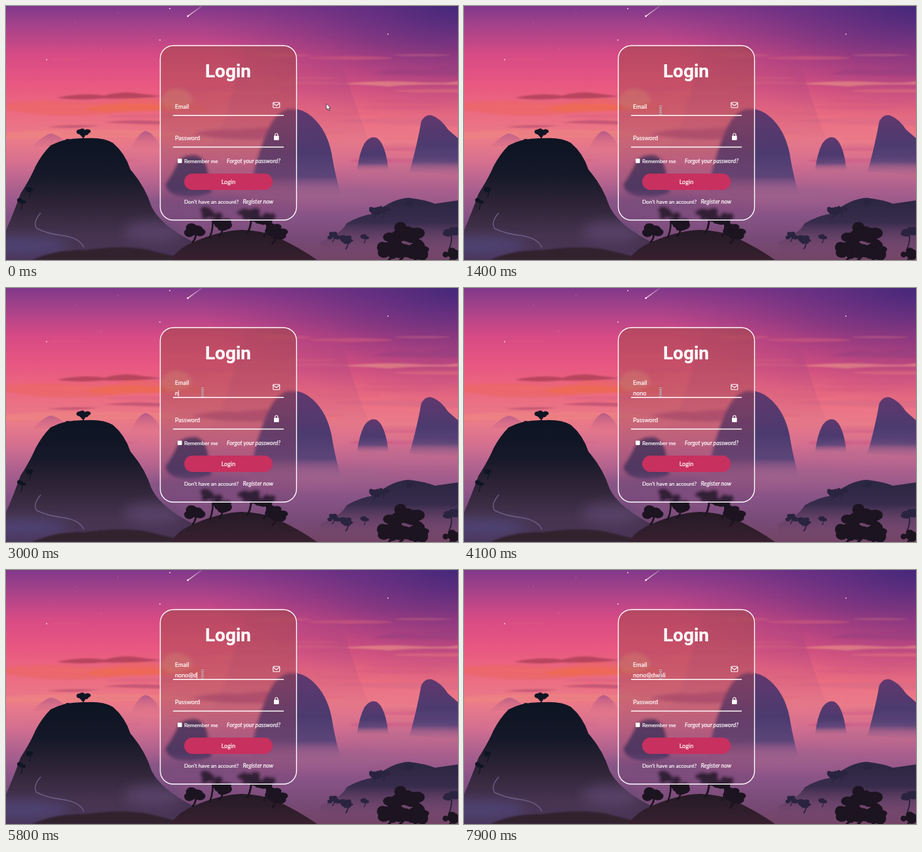
Recreate the animation shown at these times as an HTML page. Size 690 px wide and 388 px high, loop 8000 ms.

```html
<!DOCTYPE html>
<html lang="en">
<head>
<meta charset="utf-8">
<title>Login form</title>
<style>
  html, body { margin: 0; width: 100%; height: 100%; overflow: hidden; background: #744568; }
  svg { display: block; }
  text { font: 9.1px Lato, sans-serif; fill: #fff; stroke: #fff; stroke-width: .2px; }
  .title { font: 600 28px Roboto, sans-serif; text-anchor: middle; }
  .small { font-size: 8.15px; }
  .link { font-size: 8.8px; font-style: italic; }
</style>
</head>
<body>
<svg width="690" height="388" viewBox="0 0 690 388">
  <defs>
    <linearGradient id="sky" x2="0" y2="1">
      <stop offset="0" stop-color="#80388a"/>
      <stop offset=".08" stop-color="#a6428a"/>
      <stop offset=".19" stop-color="#d64b85"/>
      <stop offset=".3" stop-color="#e85681"/>
      <stop offset=".41" stop-color="#ec6a80"/>
      <stop offset=".53" stop-color="#ea7b8a"/>
      <stop offset=".62" stop-color="#d46f90"/>
      <stop offset=".72" stop-color="#aa608e"/>
      <stop offset=".83" stop-color="#875386"/>
      <stop offset=".92" stop-color="#774a76"/>
      <stop offset="1" stop-color="#734466"/>
    </linearGradient>
    <radialGradient id="night" gradientUnits="userSpaceOnUse" cx="690" cy="0" r="400" gradientTransform="scale(1 .45)">
      <stop offset="0" stop-color="#3f2678" stop-opacity=".9"/>
      <stop offset=".45" stop-color="#552a7c" stop-opacity=".55"/>
      <stop offset="1" stop-color="#7a3080" stop-opacity="0"/>
    </radialGradient>
    <linearGradient id="giant" x2="0" y2="1">
      <stop offset="0" stop-color="#a84880" stop-opacity="0"/>
      <stop offset=".4" stop-color="#a84880" stop-opacity=".35"/>
      <stop offset="1" stop-color="#b85c88" stop-opacity="0"/>
    </linearGradient>
    <linearGradient id="far" x2="0" y2="1">
      <stop offset="0" stop-color="#60386e"/>
      <stop offset=".5" stop-color="#4c3a6e"/>
      <stop offset=".78" stop-color="#5c4579"/>
      <stop offset="1" stop-color="#8e5c8c" stop-opacity=".1"/>
    </linearGradient>
    <linearGradient id="pale" x2="0" y2="1">
      <stop offset="0" stop-color="#b4588a"/>
      <stop offset="1" stop-color="#d97088" stop-opacity=".2"/>
    </linearGradient>
    <linearGradient id="near" x2="0" y2="1">
      <stop offset="0" stop-color="#0c1422"/>
      <stop offset=".3" stop-color="#151828"/>
      <stop offset=".55" stop-color="#2f2437"/>
      <stop offset=".8" stop-color="#46334f"/>
      <stop offset="1" stop-color="#4a3558"/>
    </linearGradient>
    <linearGradient id="hill" x2="0" y2="1">
      <stop offset="0" stop-color="#2b2642"/>
      <stop offset=".4" stop-color="#382c4c"/>
      <stop offset=".9" stop-color="#744568" stop-opacity="0"/>
    </linearGradient>
    <linearGradient id="mound" x2="0" y2="1">
      <stop offset="0" stop-color="#251a26"/>
      <stop offset="1" stop-color="#38202f"/>
    </linearGradient>
    <linearGradient id="tint" x2="0" y2="1">
      <stop offset="0" stop-color="#a04840" stop-opacity=".5"/>
      <stop offset=".45" stop-color="#a04858" stop-opacity=".42"/>
      <stop offset="1" stop-color="#643a6c" stop-opacity=".28"/>
    </linearGradient>
    <linearGradient id="tail" x1="1" y1="0" x2="0" y2="1">
      <stop offset="0" stop-color="#fff" stop-opacity=".15"/>
      <stop offset="1" stop-color="#ffe4ea"/>
    </linearGradient>
    <filter id="soft" x="-20%" y="-80%" width="140%" height="260%"><feGaussianBlur stdDeviation="1.2"/></filter>
    <filter id="mist" x="-30%" y="-100%" width="160%" height="300%"><feGaussianBlur stdDeviation="9"/></filter>
    <filter id="glass" x="0" y="0" width="1" height="1"><feGaussianBlur stdDeviation="2.3"/></filter>
    <clipPath id="cardClip"><rect x="235.5" y="60.5" width="208" height="266.5" rx="20"/></clipPath>
  </defs>

  <g id="scene">
    <path fill="url(#sky)" d="M0 0H690V388H0z"/>
    <path fill="url(#night)" d="M0 0H690V300H0z"/>
    <g id="streaks" filter="url(#soft)"></g>
    <g filter="url(#soft)">
      <path fill="#ec6660" opacity=".6" d="M0 149Q50 142 100 147T190 140Q235 142 300 150L310 162Q230 158 150 165T0 158z"/>
      <path fill="#b04058" opacity=".85" d="M78 140Q120 132 150 137Q180 129 205 134L236 138Q185 143 150 141Q110 145 78 140z"/>
      <path fill="#ee6a52" opacity=".8" d="M120 157Q160 147 200 149T270 156Q220 161 180 160Q150 165 120 157z"/>
      <path fill="#f4a088" opacity=".5" d="M236 146Q240 127 262 126Q284 130 285 146Q270 160 244 156z"/>
      <path fill="#b64e70" opacity=".7" d="M62 185Q100 180 142 183Q110 188 62 185zM150 178Q190 172 238 176L236 181Q190 180 150 178z"/>
      <path fill="#b04a74" opacity=".75" d="M284 196Q315 186 350 189L400 185V203Q345 207 284 196z"/>
      <path fill="#f08a80" opacity=".5" d="M0 193Q90 186 250 191L290 199Q200 200 0 203z"/>
      <path fill="#e68a86" opacity=".7" d="M515 119Q570 113 620 116T690 115V120Q620 119 585 123Q550 120 515 119z"/>
      <path fill="#933c80" opacity=".5" d="M560 104Q590 94 620 98T690 87V106Q630 105 560 104z"/>
      <path fill="#d46b88" opacity=".5" d="M500 176Q560 169 690 173V183Q590 181 500 176z"/>
    </g>
    <path fill="url(#giant)" d="M375 40Q352 105 341 150T295 235H570Q548 195 534 152T498 40z"/>
    <path fill="url(#pale)" d="M40 215Q58 197 68 195Q82 196 97 215zM190 219Q203 192 213 191Q226 193 238 219z"/>
    <path fill="url(#far)" d="M372 290Q378 240 395 200Q408 163 430 157Q452 155 468 170Q490 190 497 225Q503 262 512 290z"/>
    <path fill="url(#far)" d="M536 251Q539 225 547 210Q555 198 565 201Q579 208 584 251z"/>
    <path fill="url(#far)" d="M616 253Q627 215 634 176Q640 165 650 167Q664 172 675 189L690 202V258z"/>
    <path fill="#3c3560" d="M243 272Q255 255 262 238Q270 226 290 227Q304 231 308 250L314 285Q290 295 262 290Q244 285 243 272z"/>
    <g filter="url(#mist)">
      <ellipse cx="480" cy="288" rx="110" ry="10" fill="#9c648e" opacity=".6"/>
      <ellipse cx="620" cy="254" rx="100" ry="8" fill="#b66c90" opacity=".6"/>
      <ellipse cx="290" cy="302" rx="85" ry="12" fill="#755283" opacity=".8"/>
    </g>
    <path fill="url(#near)" d="M0 343Q14 310 22 287Q38 262 45 245Q55 226 68 213Q90 201 121 202Q148 200 163 209Q182 225 190 250Q212 275 222 306Q236 335 285 360L300 388H0z"/>
    <g filter="url(#mist)">
      <ellipse cx="225" cy="345" rx="45" ry="16" fill="#634a74" opacity=".65"/>
      <ellipse cx="20" cy="366" rx="75" ry="13" fill="#51457a" opacity=".85"/>
    </g>
    <path fill="none" stroke="#74648c" stroke-width="1.5" opacity=".85" d="M53 316Q40 331 47 340Q63 348 89 351Q113 355 119 369"/>
    <path fill="#33202f" filter="url(#soft)" d="M40 388Q75 372 120 373Q175 365 215 372L280 388z"/>
    <path fill="url(#hill)" d="M480 360Q510 350 520 332Q540 320 562 317Q590 294 615 293Q640 296 655 302L690 297V388H480z"/>
    <path fill="url(#mound)" d="M251 388Q263 370 285 361Q326 343 360 342Q390 343 412 352Q450 370 475 388z"/>
    <g id="trees" stroke-linecap="round"></g>
    <path stroke="url(#tail)" stroke-width="1.4" d="M299 0L277 16"/>
    <circle cx="277.5" cy="15.5" r="1.2" fill="#fff"/>
    <g id="stars" fill="#ffd9ee"></g>
  </g>

  <g clip-path="url(#cardClip)">
    <use href="#scene" filter="url(#glass)"/>
    <path fill="url(#tint)" d="M235 60h210v268H235z"/>
  </g>
  <rect x="235.5" y="60.5" width="208" height="266.5" rx="20" fill="none" stroke="#fff" stroke-width="1.4"/>

  <text class="title" x="339" y="109">Login</text>
  <path stroke="#fff" stroke-width="1.4" d="M255 167.3H424M255 215.5H424"/>
  <text id="label" x="258" y="157">Email</text>
  <text id="value" x="258" y="164"></text>
  <path id="caret" stroke="#fff" stroke-width=".8" d="M0 156v10"/>
  <text x="258" y="205">Password</text>
  <g fill="none" stroke="#fff" stroke-width="1.1">
    <rect x="407.8" y="147.2" width="10" height="8" rx="1"/>
    <path d="M408 148.5L412.8 152.2L417.6 148.5"/>
    <path d="M410.6 199v-2a2.2 2.2 0 0 1 4.4 0v2"/>
  </g>
  <rect x="409" y="198.2" width="7.6" height="6.8" rx="1" fill="#fff"/>
  <rect x="262" y="233.3" width="6.6" height="6.6" rx=".8" fill="#fff"/>
  <text class="small" x="272" y="240">Remember me</text>
  <text class="link" x="337" y="240">Forgot your password?</text>
  <rect x="272" y="256" width="135" height="25" rx="12.5" fill="#c8305f"/>
  <text x="339.5" y="272" text-anchor="middle">Login</text>
  <text class="small" x="272" y="301.5">Don't have an account?</text>
  <text class="link" x="361.5" y="301.5">Register now</text>

  <path id="arrow" fill="#fff" stroke="#33253f" stroke-width=".8" d="M0 0V9.5L2.2 7.5L3.8 11L5.3 10.3L3.8 7H6.5z"/>
  <g id="beam" fill="none">
    <path stroke="#e2cdd6" stroke-width="2.4" d="M-2 -5.5H2M0 -5.5V5.5M-2 5.5H2"/>
    <path stroke="#704258" stroke-width=".8" d="M-2 -5.5H2M0 -5.5V5.5M-2 5.5H2"/>
  </g>
</svg>
<script>
const $ = id => document.getElementById(id);
let seed = 7;
const rnd = () => (seed = seed * 16807 % 2147483647) / 2147483647;
const ellipse = (x, y, rx, ry, fill, opacity = 1) =>
  `<ellipse cx="${x}" cy="${y}" rx="${rx}" ry="${ry}" fill="${fill}" opacity="${opacity}"/>`;

// Thin painterly cloud bands
let bands = '';
for (let i = 0; i < 45; i++) {
  const y = 75 + rnd() * 175;
  const color = ['#f28a80', '#c85083', '#e96f78'][i % 3];
  bands += ellipse(rnd() * 690, y, 25 + rnd() * 65, 1 + rnd() * 2.5, color, .12 + rnd() * .25);
}
$('streaks').innerHTML = bands;

// Each tree: centre, base, crown radius, colour
function tree([x, y, base, r, color]) {
  let out = `<path d="M${x} ${y}Q${x + r * .3} ${(y + base) / 2} ${x - r * .2} ${base}" fill="none" stroke="${color}" stroke-width="${r * .14 + .5}"/>`;
  for (let i = 0; i < 9; i++)
    out += ellipse(x + (rnd() - .5) * r * 1.5, y + (rnd() - .5) * r * .8, r * (.32 + rnd() * .25), r * (.25 + rnd() * .2), color);
  return out;
}
const teal = '#0f1524', dark = '#1c1420', dusk = '#2a2440';
$('trees').innerHTML = [
  [118, 194, 204, 9, teal], [98, 206, 211, 6, teal], [85, 209, 215, 4, teal],
  [37, 280, 292, 6, teal], [24, 298, 311, 6, teal],
  [314, 318, 354, 15, dark], [288, 342, 361, 16, dark], [329, 333, 351, 16, dark],
  [372, 316, 347, 18, dark], [397, 324, 352, 15, dark], [410, 344, 363, 18, dark],
  [563, 313, 324, 9, dusk], [577, 311, 322, 8, dusk], [617, 300, 306, 6, dusk],
  [600, 346, 376, 20, dark], [623, 352, 377, 20, dark], [588, 374, 388, 19, dark], [628, 374, 388, 21, dark],
  [606, 370, 388, 22, dark], [500, 351, 360, 8, dusk], [521, 357, 371, 10, dusk], [548, 352, 362, 6, dusk],
  [679, 345, 370, 11, dusk], [680, 378, 388, 13, dark]
].map(tree).join('');

$('stars').innerHTML = [[250, 4], [235, 52], [62, 82], [583, 43], [106, 25], [171, 11], [145, 66]]
  .map(([x, y], i) => `<circle cx="${x}" cy="${y}" r="${i < 4 ? .9 : .45}"/>`).join('');

const typed = 'nono@dwoli';
const keys = [2900, 3100, 3300, 3500, 4700, 5800, 6300, 6900, 7100, 7300];
const focusAt = 1500;
const ease = (t, from, to) => {
  const u = Math.min(1, Math.max(0, (t - from) / (to - from)));
  return u * u * (3 - 2 * u);
};
const place = (el, x, y) => el.setAttribute('transform', `translate(${x} ${y})`);
const show = (el, on) => el.setAttribute('visibility', on ? 'visible' : 'hidden');

function draw(t) {
  const over = ease(t, 0, 900), down = ease(t, 1000, 1400);
  place($('arrow'), 489 - 186 * over - 3 * down, 149 - 6 * over + 16 * down);
  place($('beam'), 300, 143 + 16 * down);
  show($('arrow'), t < 1200);
  show($('beam'), t >= 1200);

  $('label').setAttribute('y', 157 - 8.6 * ease(t, focusAt, 2100));
  const count = keys.filter(k => k <= t).length;
  $('value').textContent = typed.slice(0, count);

  const idle = t - (count ? keys[count - 1] : focusAt);
  place($('caret'), 258.4 + (count ? $('value').getComputedTextLength() : 0), 0);
  show($('caret'), t >= focusAt && idle % 1060 < 530);
}

const start = performance.now();
function tick() {
  const t = (performance.now() - start) % 8000;
  draw(Math.floor(t / 100) * 100);
  requestAnimationFrame(tick);
}
tick();
</script>
</body>
</html>
```
